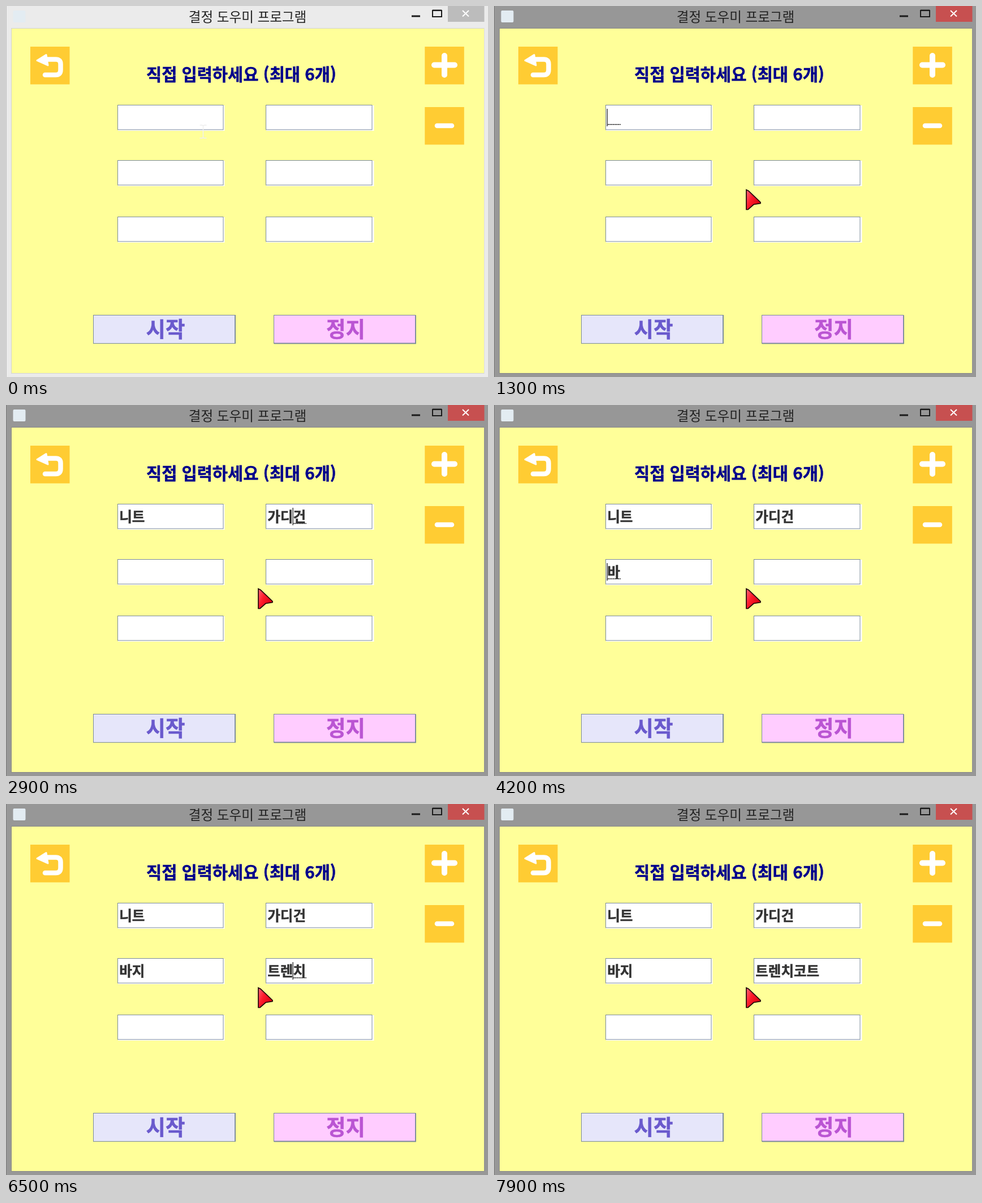
Animation, 852 px wide and 657 px high, one loop 8 s. Source, as an HTML page:

```html
<!DOCTYPE html>
<html lang="ko">
<head>
<meta charset="utf-8">
<title>결정 도우미 프로그램</title>
<style>
  html, body { margin: 0; width: 100%; height: 100%; overflow: hidden; }
  svg { display: block; width: 852px; height: 657px; }
  text { font-family: "Noto Sans CJK KR", "Noto Sans CJK", "Noto Sans CJK JP", sans-serif; white-space: pre; }
  .bold { font-weight: 800; stroke: currentColor; stroke-width: .5px; fill: currentColor; }
  .mid { text-anchor: middle; }
  .icon { fill: none; stroke: #fff; stroke-linecap: round; stroke-linejoin: round; }
  .entry { font-size: 24.5px; color: #333; }
</style>
</head>
<body>
<svg viewBox="0 0 852 657">
  <defs>
    <linearGradient id="red" x2="1" y2=".6">
      <stop stop-color="#ff6a78"/><stop offset=".45" stop-color="#ff1c2c"/><stop offset="1" stop-color="#d8000e"/>
    </linearGradient>
  </defs>

  <!-- window frame -->
  <rect id="frame" width="852" height="657"/>
  <path d="M.5 0V657" stroke="#000" stroke-opacity=".18"/>
  <rect x="9.5" y="39.5" width="835.5" height="611" fill="none" stroke="#000" stroke-opacity=".1"/>
  <rect x="10" y="40" width="835" height="610" fill="#ff9"/>
  <rect x="12.5" y="8" width="22" height="21" rx="2" fill="#e3ecf2"/>
  <text class="mid" x="427" y="28" font-size="23.6" fill="#222">결정 도우미 프로그램</text>
  <rect x="717" y="16.5" width="15" height="3" fill="#1a1a1a"/>
  <path d="M754 8H770V19H754Z M754 7.5H770" fill="none" stroke="#1a1a1a" stroke-width="2"/>
  <rect id="close" x="781" width="64.5" height="28"/>
  <path d="M807 8L818 18.5M818 8L807 18.5" stroke="#fff" stroke-width="2"/>

  <!-- tool buttons -->
  <path d="M43 72h69.5v66.7h-69.5z M740.3 72h69.5v66.7h-69.5z M740.3 179h69.5v66.5h-69.5z" fill="#fc3"/>
  <g class="icon">
    <path d="M70 94.5H88Q96.5 94.5 96.5 103V113Q96.5 122 88 122H69" stroke-width="8.5"/>
    <path d="M55 96.5L71 86.5L74 105Z" fill="#fff" stroke-width="3"/>
    <path d="M757 104.5H793M775 88V122" stroke-width="10"/>
    <path d="M762 212H788" stroke-width="8.5"/>
  </g>

  <text class="bold mid" x="416" y="132" font-size="29.5" color="#00008b">직접 입력하세요 (최대 6개)</text>

  <g id="fields"></g>

  <!-- bottom buttons -->
  <g stroke="#7a8a99">
    <rect x="154.5" y="547.5" width="251" height="50" fill="#e6e6fa"/>
    <rect x="473.5" y="547.5" width="250.5" height="50" fill="#fcf"/>
    <path d="M405 548V597.5M474 597.5H724V548" fill="none" stroke-width="1.8"/>
  </g>
  <g class="mid" font-size="37.5">
    <text class="bold" x="282" y="585.5" color="#6a5acd">시작</text>
    <text class="bold" x="600.5" y="585.5" color="#ba55d3">정지</text>
  </g>

  <path id="underline" stroke="#000" stroke-width="1.6" stroke-dasharray="2 1"/>
  <path id="caret" stroke="#222" stroke-width="1.3"/>
  <path id="beam" d="M-6 -11H-2L0 -10L2 -11H6M0 -10V11M-6 12H-2L0 11L2 12H6" fill="none" stroke="#eee" stroke-width="1.4"/>
  <path id="arrow" d="M0 0L4 2L25 22V24L13 26L3 35H0Z" fill="url(#red)" stroke="#1c0508" stroke-width="1.7"/>
</svg>
<script>
const LOOP = 8000, ADVANCE = 22.54, BLANK = ' ';
const $ = id => document.getElementById(id);
const show = (el, on) => el.setAttribute('visibility', on ? 'visible' : 'hidden');

const fields = [176, 274, 374].flatMap(y => [
  { x: 197, y, width: 186.5, edge: 2 },
  { x: 459, y, width: 187.5, edge: 3 }
]).map(f => ({ ...f, left: f.x + 3.3 }));

// time, field, committed text, syllable being composed, caret shown
const typing = [
  [0, 0, '', '', 0], [200, 0, '', '', 1], [800, 0, '', '', 0],
  [1100, 0, '', 'ㄴ', 1], [1200, 0, '', '니', 1], [1300, 0, '', BLANK, 1],
  [1500, 0, '니', '트', 1], [1800, 0, '니트', '', 0],
  [1900, 1, '', '', 1], [2100, 1, '', 'ㄱ', 1], [2200, 1, '', '가', 1],
  [2300, 1, '', '갇', 1], [2400, 1, '가', '디', 1], [2600, 1, '가', '딕', 1],
  [2700, 1, '가디', '거', 1], [2900, 1, '가디', '건', 1], [3200, 1, '가디건', '', 0],
  [3800, 2, '', '', 1], [4100, 2, '', 'ㅂ', 1], [4200, 2, '', '바', 1],
  [4400, 2, '바', '지', 1], [4800, 2, '바지', '', 0],
  [4900, 3, '', '', 1], [5300, 3, '', '', 0], [5800, 3, '', 'ㅌ', 1], [5900, 3, '', '트', 1],
  [6100, 3, '트', '레', 1], [6300, 3, '트', '렌', 1], [6400, 3, '트렌', 'ㅊ', 1],
  [6500, 3, '트렌', '치', 1], [6700, 3, '트렌', BLANK, 1], [6800, 3, '트렌치', '코', 1],
  [7000, 3, '트렌치', BLANK, 1], [7100, 3, '트렌치코', '트', 1], [7400, 3, '트렌치코트', '', 0],
  [7500, 4, '', '', 1], [7900, 4, '', '', 0]
];

// time, x, y, pointer shape
const pointer = [
  [0, 348.5, 222, 'beam'], [100, 346, 208, 'beam'], [200, 345.5, 205, 'beam'],
  [300, 354, 208, 'beam'], [400, 388, 244, 'arrow'], [500, 430, 303, 'arrow'], [600, 446, 325.5, 'arrow']
];

$('fields').innerHTML = fields.map(({ x, y, width, edge, left }) => `
  <rect x="${x + 1}" y="${y}" width="${width + edge}" height="45" fill="#fff"/>
  <rect x="${x + .5}" y="${y - .5}" width="${width}" height="43.5" fill="#fff" stroke="#7a8a99"/>
  <text class="entry bold" x="${left}" y="${y + 31.4}"></text>`).join('');
const entries = document.querySelectorAll('.entry');

const latest = (list, t) => list.filter(step => step[0] <= t).pop();

function draw(t) {
  const active = t >= 100;
  $('frame').setAttribute('fill', active ? '#979797' : '#ebebeb');
  $('close').setAttribute('fill', active ? '#c75050' : '#bcbcbc');

  entries.forEach((el, i) => {
    const step = latest(typing.filter(s => s[1] === i), t);
    el.textContent = step ? step[2] + step[3] : '';
  });

  const [, index, done, composing, caretOn] = latest(typing, t);
  const { left, y } = fields[index];
  const x = left + done.length * ADVANCE;
  $('caret').setAttribute('d', `M${x - .2} ${y + 6}v31`);
  $('underline').setAttribute('d', `M${x + 1} ${y + 33.8}h22.5`);
  show($('caret'), caretOn);
  show($('underline'), composing);

  const [, px, py, shape] = latest(pointer, t);
  for (const id of ['beam', 'arrow']) {
    show($(id), id === shape);
    $(id).setAttribute('transform', `translate(${px} ${py})`);
  }
}

const start = performance.now();
function tick() {
  draw((performance.now() - start) % LOOP);
  requestAnimationFrame(tick);
}
tick();
</script>
</body>
</html>
```
